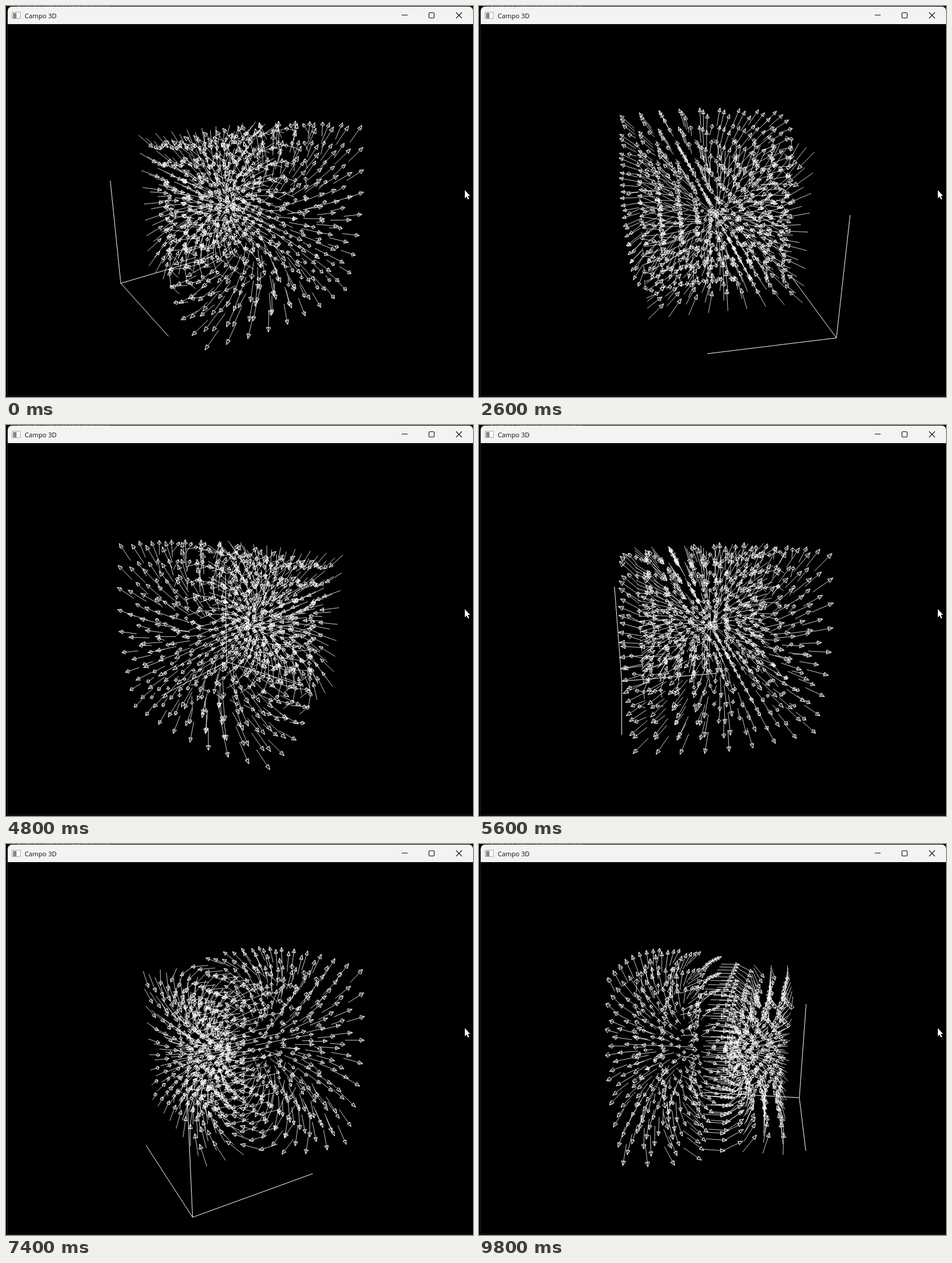
Write an HTML page with a canvas that moves like this. It is 800 px wide and 669 px high and loops after 10000 ms.

```html
<!DOCTYPE html>
<html lang="en">
<head>
<meta charset="utf-8">
<title>Campo 3D</title>
<style>
  html, body { margin: 0; width: 100%; height: 100%; overflow: hidden; background: #000; }
  canvas { display: block; }
</style>
</head>
<body>
<canvas id="stage" width="800" height="669"></canvas>
<script>
const ctx = document.getElementById('stage').getContext('2d');

const STEP_MS = 200, STEPS = 50;
const START_ANGLE = 34.8, STEP_ANGLE = 12;       // degrees
const CENTER_X = 401, CENTER_Y = 349, FOCAL = 770, DISTANCE = 4.667;
const PITCH = 20 * Math.PI / 180;
const GRID = 9, HALF = 0.744;
const ARROW = 0.207, HEAD = 0.042, HEAD_RADIUS = 0.021;
const AXIS = 1.243;

const add = (p, v, k) => p.map((c, i) => c + v[i] * k);
const unit = v => { const n = Math.hypot(...v); return v.map(c => c / n); };
const cross = (a, b) => [
  a[1] * b[2] - a[2] * b[1],
  a[2] * b[0] - a[0] * b[2],
  a[0] * b[1] - a[1] * b[0]
];

// Direction of a point dipole along x
function fieldAt([x, y, z]) {
  const r2 = x * x + y * y + z * z;
  return unit([3 * x * x - r2, 3 * x * y, 3 * x * z]);
}

// Shaft plus a four-sided wire pyramid, as polylines
function arrowLines(tail) {
  const dir = fieldAt(tail);
  const tip = add(tail, dir, ARROW);
  const neck = add(tail, dir, ARROW - HEAD);
  const side = unit(cross(dir, Math.abs(dir[1]) > 0.99 ? [1, 0, 0] : [0, 1, 0]));
  const other = cross(dir, side);
  const [a, b, c, d] = [[side, 1], [other, 1], [side, -1], [other, -1]]
    .map(([v, s]) => add(neck, v, s * HEAD_RADIUS));
  return [[tail, neck], [a, tip, c], [b, tip, d], [a, b, c, d, a]];
}

function buildAxes() {
  const corner = [-1, -1, -1];
  return [[1, 0, 0], [0, 1, 0], [0, 0, 1]].map(v => [corner, add(corner, v, AXIS)]);
}

function buildField() {
  const lines = [];
  const coord = i => HALF * (2 * i / (GRID - 1) - 1);
  for (let i = 0; i < GRID; i++)
    for (let j = 0; j < GRID; j++)
      for (let k = 0; k < GRID; k++) {
        const p = [coord(i), coord(j), coord(k)];
        if (Math.hypot(...p) > 1e-6) lines.push(...arrowLines(p));
      }
  return lines;
}

const axes = buildAxes(), field = buildField();

function projector(angle) {
  const s = Math.sin(angle), c = Math.cos(angle);
  const sp = Math.sin(PITCH), cp = Math.cos(PITCH);
  return ([x, y, z]) => {
    const right = x * s + z * c, front = x * c - z * s;
    const scale = FOCAL / (DISTANCE - y * sp - front * cp);
    return [CENTER_X + right * scale, CENTER_Y - (y * cp - front * sp) * scale];
  };
}

function strokeLines(lines, color, width = 1) {
  ctx.strokeStyle = color;
  ctx.lineWidth = width;
  ctx.beginPath();
  for (const line of lines)
    line.forEach(([x, y], i) => i ? ctx.lineTo(x, y) : ctx.moveTo(x, y));
  ctx.stroke();
}

function drawWindow() {
  ctx.fillStyle = '#000';
  ctx.fillRect(0, 0, 800, 669);

  // Text of the window behind, mostly covered
  ctx.fillStyle = '#aaa';
  ctx.font = '12px "Open Sans", sans-serif';
  ctx.fillText('C:\\Users\\demo\\Documents\\', 20, 2);
  strokeLines([[[2.5, 8], [2.5, 668]], [[2, 667.5], [800, 667.5]]], '#222');

  ctx.fillStyle = '#f3f3f3';
  ctx.beginPath();
  ctx.roundRect(3, 1, 797, 30, [7, 7, 0, 0]);
  ctx.fill();

  ctx.fillStyle = '#fff';
  ctx.fillRect(11, 10, 14, 12);
  ctx.fillStyle = '#888';
  ctx.fillRect(12, 12, 6, 9);
  ctx.lineWidth = 1;
  ctx.strokeStyle = '#aaa';
  ctx.strokeRect(10.5, 10.5, 14, 11);

  ctx.fillStyle = '#111';
  ctx.font = '11.2px "Open Sans", "Noto Sans", sans-serif';
  ctx.fillText('Campo 3D', 32, 21);

  strokeLines([
    [[678, 15.5], [688, 15.5]],
    [[771, 11], [781, 21]],
    [[781, 11], [771, 21]]
  ], '#111', 1.1);
  ctx.beginPath();
  ctx.roundRect(724.5, 11.5, 9, 9, 1.5);
  ctx.stroke();
}

function drawCursor() {
  ctx.fillStyle = '#fff';
  ctx.beginPath();
  [[786, 315], [786, 329], [789, 326], [791.5, 331], [793.5, 330], [791, 325], [795, 325]]
    .forEach(([x, y]) => ctx.lineTo(x, y));
  ctx.fill();
}

function render(now) {
  const step = Math.floor(now / STEP_MS) % STEPS;
  const project = projector((START_ANGLE + STEP_ANGLE * step) * Math.PI / 180);
  const draw = (lines, width) => strokeLines(lines.map(line => line.map(project)), '#fff', width);
  drawWindow();
  draw(axes, 1);
  draw(field, 0.8);
  drawCursor();
}

const start = performance.now();
function tick() {
  render(performance.now() - start);
  requestAnimationFrame(tick);
}
tick();
</script>
</body>
</html>
```
